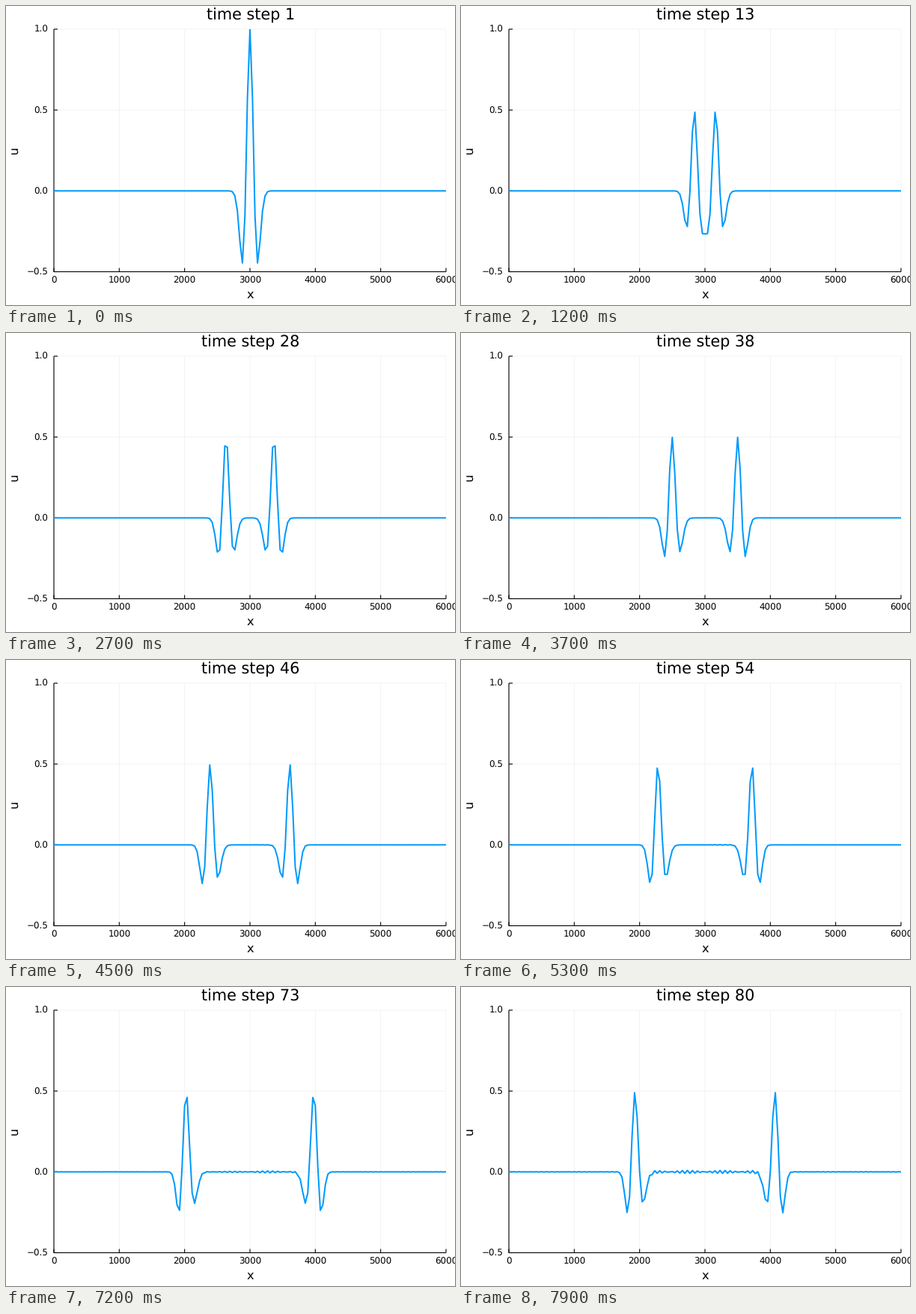
A matplotlib script for the animation above (8000 ms loop, 600 by 400 pixels).

```python
import numpy as np
import matplotlib.pyplot as plt
from matplotlib.animation import FuncAnimation
from matplotlib.patches import Rectangle

plt.rcParams["font.family"] = "DejaVu Sans"
plt.rcParams["text.hinting"] = "no_hinting"

W, H, DPI = 600, 400, 100
LEFT, RIGHT, TOP, BOTTOM = 64, 588, 31, 355.5
STEPS = 80
CELLS = 156
COURANT = 0.3497

fig = plt.figure(figsize=(W / DPI, H / DPI), dpi=DPI, facecolor="white")
ax = fig.add_axes([0, 0, 1, 1])
ax.set_xlim(0, W)
ax.set_ylim(H, 0)
ax.axis("off")


def pt(px):
    return px * 72 / DPI


def px_x(x):
    return LEFT + (RIGHT - LEFT) * x / 6000


def px_y(u):
    return BOTTOM - (BOTTOM - TOP) * (u + 0.5) / 1.5


def rule(x0, y0, x1, y1, width=1.1, color="black", z=2):
    ax.plot([x0, x1], [y0, y1], color=color, lw=pt(width), zorder=z,
            solid_capstyle="butt", snap=False)


def label(x, y, s, size, ha="center", **kw):
    return ax.text(x, y, s, fontsize=pt(size), ha=ha, va="baseline", **kw)


# grid, ticks and axes
for v in range(0, 6001, 1000):
    x = px_x(v)
    rule(x, TOP, x, BOTTOM, 0.8, "#f0f0f0", 1)
    rule(x, BOTTOM, x, BOTTOM - 5)
    label(x, 371.3, str(v), 11.9)
for v in (-0.5, 0.0, 0.5, 1.0):
    y = px_y(v)
    rule(LEFT, y, RIGHT, y, 0.8, "#f0f0f0", 1)
    rule(LEFT, y, LEFT + 5, y)
    label(56.3, y + 4.3, f"{v:.1f}".replace("-", "\u2212"), 11.9, "right")
rule(LEFT, TOP, LEFT, BOTTOM + 0.5)
rule(LEFT, BOTTOM, RIGHT, BOTTOM)

mid = (LEFT + RIGHT) / 2
label(mid, 391.3, "x", 16.3)
label(16, 192.6, "u", 16.3, rotation=90, rotation_mode="anchor")
title = label(mid + 0.7, 18.2, "", 20.8)

# Ricker pulse, spread in Fourier space with leapfrog time dispersion
cell = np.arange(CELLS + 1) - CELLS // 2
s = (np.pi * cell[:-1] * 6000 / CELLS / 300) ** 2
modes = np.fft.rfft((1 - 2 * s) * np.exp(-s))
k = 2 * np.pi * np.arange(modes.size) / CELLS
omega = 2 * np.arcsin(COURANT * k / 2)


def ripple(step):
    """Growing grid-scale sawtooth, stronger between the pulses."""
    left = 0.012 * np.exp(0.15 * (step - STEPS))
    right = 0.012 * np.exp(0.075 * (step - STEPS))
    amp = np.where(cell < 0, left, right)
    inside = np.abs(cell) < COURANT * step - 5
    env = np.where(inside, 1.0, 0.13)
    beat = np.sin(np.pi * cell / 14)
    swing = np.cos(omega[-1] * (step - STEPS) - 0.7)
    return amp * env * beat * (-1.0) ** cell * swing


def wave(step):
    u = np.fft.irfft(modes * np.cos(omega * (step - 1)), CELLS)
    return np.append(u, u[0]) + ripple(step)


curve, = ax.plot([], [], color="#009afa", lw=pt(2), zorder=3, snap=False,
                 solid_joinstyle="round", solid_capstyle="butt")
curve.set_clip_path(Rectangle((LEFT, TOP), RIGHT - LEFT, BOTTOM - TOP,
                              transform=ax.transData))
xs = np.linspace(LEFT, RIGHT, CELLS + 1)


def draw(i):
    step = i + 1
    title.set_text(f"time step {step}")
    curve.set_data(xs, px_y(wave(step)))
    return title, curve


anim = FuncAnimation(fig, draw, frames=STEPS, interval=100, repeat=True,
                     repeat_delay=0, blit=False)
plt.show()
```
